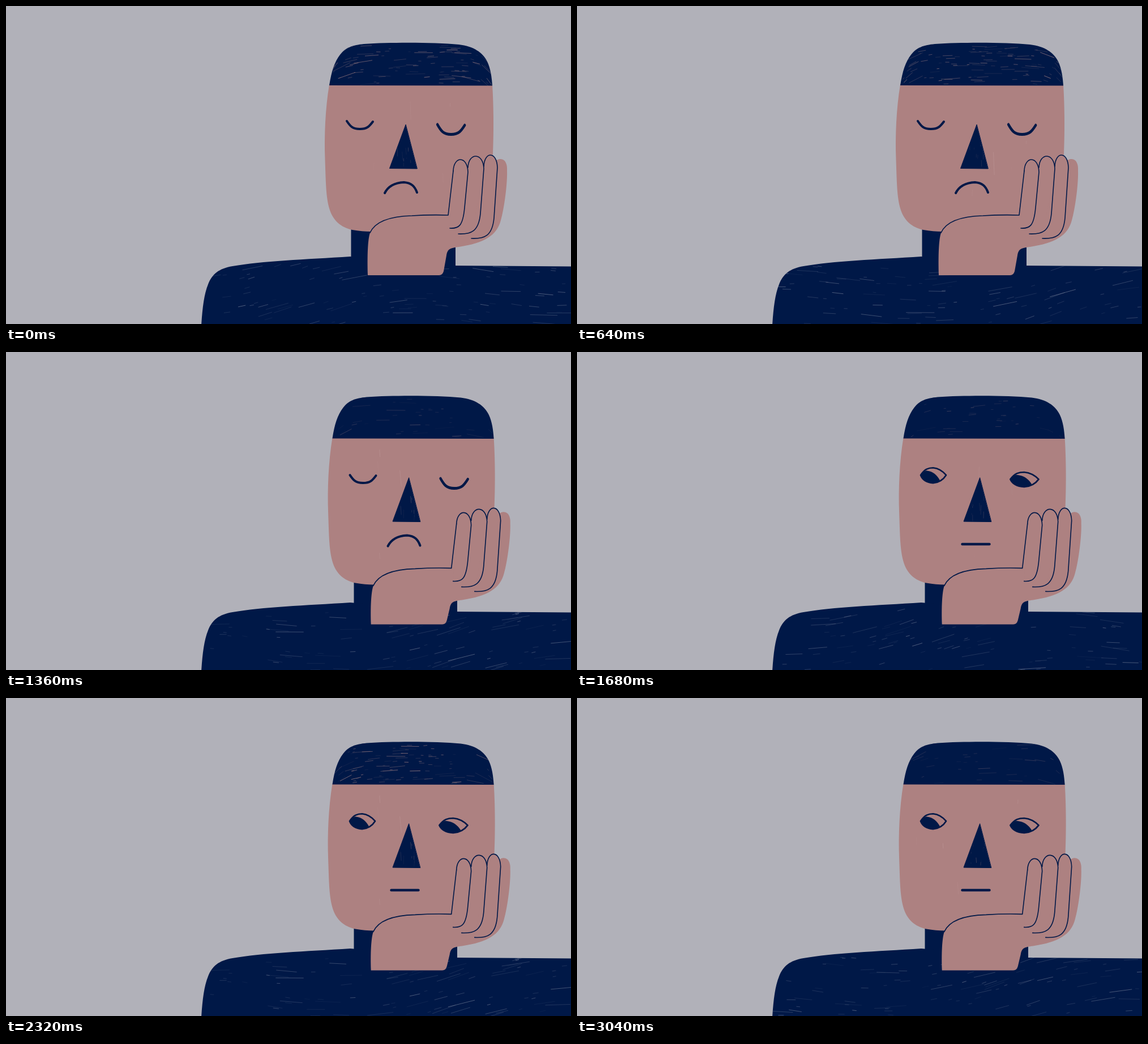
An HTML page with a canvas that plays this animation: 998x561 px, repeating every 3.12 s.

```html
<!DOCTYPE html>
<html lang="en">
<head>
<meta charset="utf-8">
<title>Bored</title>
<style>
html, body { margin: 0; width: 100%; height: 100%; overflow: hidden; background: #b1b1b9; }
canvas { display: block; width: 998px; height: 561px; }
</style>
</head>
<body>
<canvas id="stage" width="998" height="561"></canvas>
<script>
const ctx = document.getElementById('stage').getContext('2d');
const LOOP = 3120, TICK = 80, WAKE = 1680;
const BG = '#b1b1b9', SKIN = '#ad8181', NAVY = '#001847', GREY = '#aaabba', PINK = '#b38988';
const P = d => new Path2D(d);

const body = P('M345 563C347 532 350 508 357 491C364 473 376 463 400 459C450 450 530 447 608 442L795 458L1000 459.5V563Z');
const face = P('M571 139C564 180 562 230 563.5 270C565 312 565 335 571 357C577 378 592 391 612 395C624 397 634 398 646 398H800L860 262C862 215 861 170 859 139Z');
const hair = P('M571 140C575 115 580 99 590 86C600 73 612 69 632 67C680 64 755 64 800 68C826 71 842 82 850 98C856 110 858 126 859 140.5Z');
const nose = P('M706 209.5L677.5 286.5L726 287Z');
const frown = P('M669 330C674 320 684 312 703 311C716 312 722 318 726 329');
const flat = P('M675 326.5H723');

// Eye parts, with the left corner at the origin
const lid = P('M0 0C6 9 10 14 23 14C36 14 40 9 46 1');
const almond = P('M0 0C7 -11 14 -13 22 -13C32 -12 40 -6 45 0C40 8 32 13 22 14C10 13 3 8 0 0Z');
const iris = P('M0 0Q4 -7 10 -8C22 -7 29 0 34 9C28 14 22 14 16 13C8 12 3 7 0 0Z');

const thumb = 'C652 380 680 371 717 370Q749 368 781 369';
const thumbLine = P('M643 400' + thumb + 'L790 291');
const fingers = [
  finger(790, 816, 271, 784, 392),
  finger(816, 844, 265, 799, 402),
  finger(844, 868, 263, 822, 410)
];

function finger(left, right, top, endX, endY) {
  return P(`M${left} ${top + 20}C${left + 1} ${top - 7} ${right - 1} ${top - 7} ${right} ${top + 22}` +
    `L${right - 6} ${endY - 36}C${right - 9} ${endY - 4} ${(right + endX) / 2} ${endY + 1} ${endX} ${endY}`);
}

function palm(bottom) {
  return P(`M639 ${bottom}C638 440 639 412 643 400${thumb}L830 300L866 272C880 265 886 277 885 290` +
    'C886 312 880 358 874 378C867 405 845 418 800 425' +
    `C785 427 780 428 778 440L773 ${bottom - 7}Q771 ${bottom} 765 ${bottom}Z`);
}

function random(seed) {
  let s = seed * 7919 + 13;
  return () => {
    s = (s + 0x6D2B79F5) | 0;
    let r = Math.imul(s ^ (s >>> 15), 1 | s);
    r = (r + Math.imul(r ^ (r >>> 7), 61 | r)) ^ r;
    return ((r ^ (r >>> 14)) >>> 0) / 4294967296;
  };
}

// Dry-brush marks inside a shape; slope(x) gives the brush direction
function hatch(shape, seed, count, [x, y, w, h], length, slope, color, strength) {
  const rnd = random(seed);
  ctx.save();
  ctx.clip(shape);
  ctx.strokeStyle = color;
  for (let i = 0; i < count; i++) {
    const px = x + rnd() * w, py = y + rnd() * h;
    const angle = slope(px) + (rnd() - .5) * .16;
    const half = length * (.1 + .9 * rnd() ** 2) / 2;
    const dx = Math.cos(angle) * half, dy = Math.sin(angle) * half;
    ctx.globalAlpha = strength * (.2 + .8 * rnd());
    ctx.lineWidth = .4 + rnd() * .6;
    ctx.beginPath();
    ctx.moveTo(px - dx, py - dy);
    ctx.lineTo(px + dx, py + dy);
    ctx.stroke();
  }
  ctx.restore();
}

function fill(path, color) {
  ctx.fillStyle = color;
  ctx.fill(path);
}

function line(path, width) {
  ctx.strokeStyle = NAVY;
  ctx.lineWidth = width;
  ctx.stroke(path);
}

function at(x, y, draw, sx = 1, sy = 1) {
  ctx.save();
  ctx.translate(x, y);
  ctx.scale(sx, sy);
  draw();
  ctx.restore();
}

const upright = () => 1.55;
const hairSlope = x => 1.1 * ((x - 715) / 144) ** 5 - .03;

function smooth(t) {
  t = Math.min(1, Math.max(0, t));
  return t * t * (3 - 2 * t);
}

function openEye() {
  fill(iris, NAVY);
  line(almond, 2.6);
}

function head(seed, drop, dense, awake) {
  const narrow = 1 - .01 * drop;
  at(571 * (1 - narrow), 0, () => {
    fill(face, SKIN);
    hatch(face, seed + 40, 5, [580, 150, 270, 200], 40, upright, '#c3a1a1', .45);
    fill(hair, NAVY);
    hatch(hair, seed + 20, dense ? 90 : 35, [575, 70, 280, 68], 34, hairSlope, PINK, dense ? .75 : .35);
  }, narrow);
  fill(nose, NAVY);
  line(nose, 1);
  hatch(nose, seed + 60, 9, [690, 245, 28, 36], 16, upright, PINK, .35);
  if (awake) {
    at(601.5, 204.7, openEye);
    at(760, 212, openEye, 1.11, .97);
    line(flat, 4.4);
  } else {
    const y = 203 + 1.6 * drop;
    at(602, y, () => line(lid, 4));
    at(762, y + 6, () => line(lid, 4), 1.05, 1.25);
    line(frown, 4);
  }
}

function render(i) {
  // The head sinks first, then takes the hand along
  const sink = smooth((i - 10) / 6), push = smooth((i - 12) / 4);
  const seed = i % 12;
  const dense = sink < .5 || i % 5 === 4;

  ctx.globalAlpha = 1;
  ctx.lineCap = ctx.lineJoin = 'round';
  fillBack(push);
  const lean = x => .2 * Math.sin(x / 110 + seed * 2) - .1;
  hatch(body, seed + 1, 90, [360, 455, 638, 106], 50, lean, GREY, .5);

  at(9 * push - 3.5 * sink, 12.5 * sink, () => head(seed, sink, dense, i * TICK >= WAKE));
  at(5.7 * push, 12.4 * push, () => {
    fill(palm(475 - 7 * push), SKIN);
    fingers.forEach(f => fill(f, SKIN));
    fingers.forEach(f => line(f, 1.6));
    line(thumbLine, 1.6);
  });
}

function fillBack(push) {
  ctx.fillStyle = BG;
  ctx.fillRect(0, 0, 998, 561);
  ctx.fillStyle = NAVY;
  ctx.fillRect(609.5 + 5 * push, 385, 184.5 + push * -2, 90);
  fill(body, NAVY);
}

let shown = -1;
const start = performance.now();
function loop(now) {
  const i = Math.floor(Math.max(0, now - start) % LOOP / TICK);
  if (i !== shown) render(shown = i);
  requestAnimationFrame(loop);
}
render(0);
requestAnimationFrame(loop);
</script>
</body>
</html>
```
